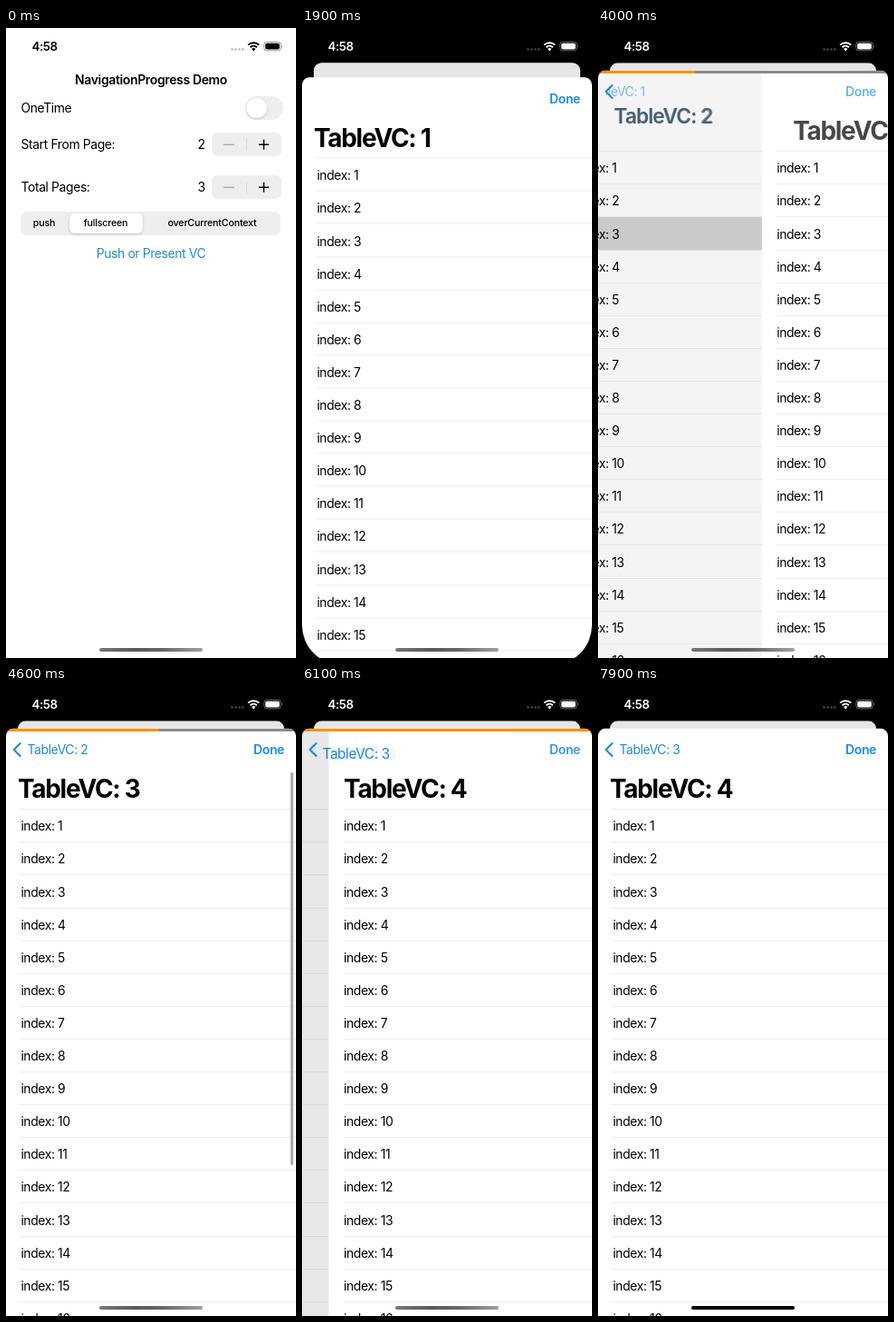
These frames come from a looping animation (320 by 693 pixels, 8000 ms). An HTML page:

```html
<!DOCTYPE html>
<html lang="en">
<head>
<meta charset="utf-8">
<title>NavigationProgress Demo</title>
<style>
  html, body { margin: 0; width: 100%; height: 100%; overflow: hidden; background: #000; }
  body { font: 13.95px/20px Inter, sans-serif; letter-spacing: -.4px; font-optical-sizing: none; }
  div, span, svg { position: absolute; box-sizing: border-box; }
  span { white-space: nowrap; margin-top: -10px; }
  #stage { left: 0; top: 0; width: 320px; height: 693px; overflow: hidden; background: #000; color: #000; }
  #root, #sheet, .panel, .dim, #nav { left: 0; top: 0; width: 320px; height: 693px; }
  #root { background: #fff; overflow: hidden; transform-origin: 50% 0; }
  .dim { background: #000; opacity: 0; }
  .panel { background: #fff; overflow: hidden; }
  .row { left: 16.4px; right: 0; height: 37px; border-top: 1px solid #ececed; }
  .selected { left: 0; width: 320px; height: 36.1px; background: #d3d3d6; }
  .scroller { left: 314.2px; top: 95px; width: 2.7px; height: 432px; border-radius: 2px; background: #aaa; }
  .blue { color: #1a8ae6; }
  .semi { font-weight: 600; letter-spacing: -.33px; }
  .big { font-size: 27.9px; font-weight: 700; letter-spacing: -.045em; }
  .big, .back { left: 0; top: 0; transform-origin: 0 50%; }
  .mid { transform: translateX(-50%); }
  .small { font-size: 10.7px; font-weight: 500; letter-spacing: -.2px; }
  .clock { font-size: 13.3px; font-weight: 600; }
  .box { background: #eeeeef; border-radius: 6.5px; }
  .white { background: #fff; box-shadow: 0 1px 3px #0003; }
  #backs { left: 0; top: 46px; width: 320px; height: 110px; }
  #bar { left: 0; top: 46.8px; width: 320px; height: 3.3px; background: #8a8a8a; }
  #fill { left: 0; top: 0; height: 100%; background: #ff9008; }
  #home { left: 103px; top: 682.2px; width: 114px; height: 4.2px; border-radius: 3px; }
</style>
</head>
<body>
<div id="stage"></div>
<script>
const LOOP = 8000, STEP = 100, PAGES = 5, ROW = 36.1, LIST_TOP = 135.2;
const PRESENT = 1520, PUSHES = [2751, 3913, 4875, 6550], POP = 7250;
const TOUCHES = [2600, 3800, 4860, 6550], TOUCHED_ROW = [4, 3, 3, 4];
const LIFTED = [PRESENT, ...PUSHES];
const CARD_TOP = 38.6, SHEET_TOP = 46.8;

const $ = id => document.getElementById(id);
const clamp = v => Math.min(1, Math.max(0, v));
const ramp = (t, a, b) => clamp((t - a) / (b - a));
const smooth = v => v * v * (3 - 2 * v);
// Critically damped spring that snaps to its end once it is close.
const spring = (ms, speed = 17) => {
  const x = Math.max(0, ms) / 1000 * speed;
  const rest = (1 + x) * Math.exp(-x);
  return rest < .005 ? 1 : 1 - rest;
};
const range = n => Array.from({ length: n }, (_, i) => i + 1);

const text = (x, y, str, cls = '', id = '') =>
  `<span id="${id}" class="${cls}" style="left:${x}px;top:${y}px">${str}</span>`;
const box = (x, y, w, h, cls, radius) =>
  `<div class="${cls}" style="left:${x}px;top:${y}px;width:${w}px;height:${h}px;border-radius:${radius}px"></div>`;
const stepper = y => box(227, y - 13.5, 77, 26.5, 'box', 6.5) + `
  <svg style="left:227px;top:${y - 13.5}px" width="77" height="27" fill="none" stroke-width="1.4">
    <path d="M13 13.3h12" stroke="#aaa"/><path d="M38.5 7v13" stroke="#d8d8da" stroke-width="1"/>
    <path d="M52 13.3h11M57.5 7.8v11" stroke="#000"/></svg>`;

const rootView = `<div id="root">
  ${text(160, 57, 'NavigationProgress Demo', 'semi mid')}
  ${text(16.5, 88, 'OneTime')}
  ${box(263.5, 75, 42, 25.5, 'box', 13)}${box(265, 76.5, 22.5, 22.5, 'white', 12)}
  ${text(16.5, 128, 'Start From Page:')}${text(211.5, 128, '2')}${stepper(128)}
  ${text(16.5, 175, 'Total Pages:')}${text(211.5, 175, '3')}${stepper(175)}
  ${box(16, 202, 287, 26, 'box', 7)}${box(69.5, 203.7, 81, 22.6, 'white', 5.7)}
  ${text(42, 215, 'push', 'small mid')}
  ${text(110, 215, 'fullscreen', 'semi small mid')}
  ${text(227.5, 215, 'overCurrentContext', 'small mid')}
  ${text(160, 248, 'Push or Present VC', 'blue mid', 'link')}
  <div class="dim" id="rootDim"></div></div>`;

const panel = k => `<div class="panel" id="panel${k}">
  <div class="selected" id="selected${k}" style="top:${LIST_TOP + ROW * ((TOUCHED_ROW[k - 1] || 1) - 1) + .5}px"></div>
  ${range(16).map(i => `<div class="row" style="top:${LIST_TOP + ROW * (i - 1)}px">${text(0, 18.2, 'index: ' + i)}</div>`).join('')}
  <div class="scroller" id="scroller${k}"></div><div class="dim" id="dim${k}"></div></div>`;

const sheetView = `<div id="sheet">${range(PAGES).map(panel).join('')}
  <div id="nav">
    <div id="backs">${range(PAGES).map(k => text(0, 0, 'TableVC: ' + k, 'back blue', 'back' + k)).join('')}</div>
    ${range(PAGES).map(k => text(0, 0, 'TableVC: ' + k, 'big', 'title' + k)).join('')}
    <svg id="chevron" style="left:0;top:60px" width="20" height="20" fill="none" stroke="#1a8ae6"
      stroke-width="2" stroke-linecap="round" stroke-linejoin="round"><path d="M15.7 3l-7 7 7 7"/></svg>
    ${text(273, 70, 'Done', 'semi blue', 'done')}
  </div>
  <div id="bar"><div id="fill"></div></div></div>`;

const statusBar = `<div id="status">${text(28.5, 20, '4:58', 'clock')}
  <svg style="left:240px;top:10px" width="70" height="20" fill="currentColor">
    <g opacity=".28">${[9.5, 13.5, 17.5, 21.2].map(x => `<circle cx="${x}" cy="13.5" r="1.3"/>`).join('')}</g>
    <g fill="none" stroke="currentColor" stroke-width="2">
      <path d="M27.2 8.6a8.6 8.6 0 0 1 12 0M29.5 11.2a5.4 5.4 0 0 1 7.4 0"/></g>
    <path d="M33.2 15.5l-2.2-2.4a3.3 3.3 0 0 1 4.4 0z"/>
    <rect x="44.8" y="5.3" width="18.4" height="9.6" rx="3" fill="none" stroke="currentColor" opacity=".4"/>
    <rect x="46.2" y="6.7" width="15.6" height="6.8" rx="1.8"/>
    <path d="M64.4 8.3q1.6 1.8 0 3.6z" opacity=".45"/></svg></div>`;

$('stage').innerHTML = rootView + sheetView + statusBar + '<div id="home"></div>';

function set(id, style) { Object.assign($(id).style, style); }

function drawPresentation(t) {
  const p = spring(t - PRESENT);
  const gray = Math.round(255 * p);
  set('root', {
    transform: `translateY(${CARD_TOP * p}px) scale(${1 - .082 * p})`,
    borderRadius: p ? `${39 - 30 * p}px` : 0
  });
  set('rootDim', { opacity: .1 * p });
  set('link', { opacity: t >= 1400 && t < PRESENT ? .3 : 1 });
  set('sheet', {
    transform: `translateY(${(693 - SHEET_TOP) * (1 - p)}px)`,
    clipPath: `inset(${SHEET_TOP}px 0 0 0 round 8.2px 8.2px ${t < 2100 ? '44px 44px' : '0 0'})`
  });
  set('status', { color: `rgb(${gray},${gray},${gray})` });
}

function drawPage(k, depth, t, pop) {
  const e = depth - k;              // below 0: arriving, above 0: covered
  const covered = clamp(e), ahead = clamp(-e);
  const shown = e > -1 && e < 1 ? 'visible' : 'hidden';
  set('panel' + k, { visibility: shown, transform: `translateX(${320 * ahead - 96 * covered}px)` });
  set('dim' + k, { opacity: .1 * covered });

  const age = t - LIFTED[k - 1];
  set('scroller' + k, { opacity: ramp(age, 400, 445) - ramp(age, 745, 870) });
  const touched = t >= TOUCHES[k - 1] && (k === 4 || t < PUSHES[k - 1] + 900);
  set('selected' + k, { opacity: touched ? (k === 4 ? 1 - pop : 1) : 0 });

  // The large title shrinks into the back label of the next page.
  const x = 13 + 10.5 * covered, y = 113.3 - 43.3 * covered ** 1.15;
  set('title' + k, {
    visibility: shown,
    opacity: e > 0 ? (1 - covered) ** 1.3 : clamp(1.65 * (1 - ahead)),
    transform: `translate(${x + 358 * ahead}px,${y}px) scale(${1 - .44 * covered})`
  });
  const leaving = clamp(e - 1);
  set('back' + k, {
    opacity: clamp(1.3 * covered) * (1 - leaving),
    transform: `translate(${x - 82 * leaving}px,${y - 46}px) scale(${1 + 1.14 * (1 - covered)})`
  });
}

function draw(t) {
  const pop = spring(t - POP, 13);
  const nudge = .1 * Math.sin(Math.PI * ramp(t, 5950, 6350));
  const depth = 1 + PUSHES.reduce((sum, s) => sum + spring(t - s), 0) - pop - nudge;
  const first = clamp(depth - 1), part = depth % 1;

  drawPresentation(t);
  range(PAGES).forEach(k => drawPage(k, depth, t, pop));

  set('backs', { clipPath: 'inset(0 0 0 9px)' });
  set('chevron', { opacity: first ** 10, transform: `translateX(${75 * (1 - first)}px)` });
  set('done', { opacity: 1 - 1.4 * part * (1 - part) });

  const progress = PUSHES.slice(0, 3).reduce((sum, s) => sum + smooth(ramp(t, s + 400, s + 920)) / 3, 0);
  set('bar', { opacity: t < PUSHES[0] ? 0 : 1 - spring(t - PUSHES[3]) });
  set('fill', { width: `${320 * progress}px` });

  const solid = t >= 2600 && t < 3950 || t >= PUSHES[3];
  set('home', { background: solid ? '#000' : 'linear-gradient(90deg,#777,#5a5a5a 35%,#666 60%,#a0a0a0)' });
}

function tick(now) {
  draw(Math.floor(now % LOOP / STEP) * STEP);
  requestAnimationFrame(tick);
}
draw(0);
requestAnimationFrame(tick);
</script>
</body>
</html>
```
